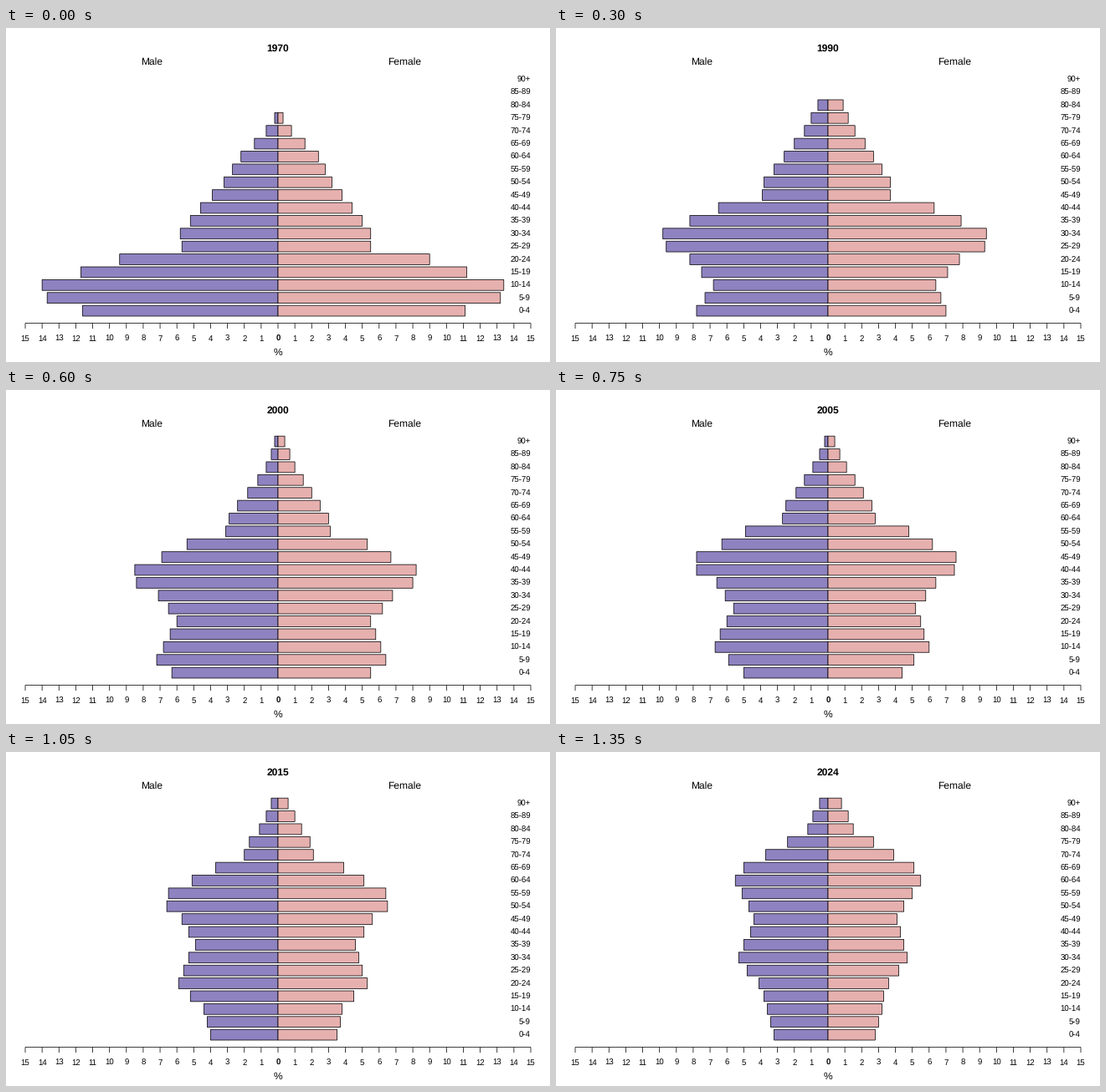
Recreate the animation shown at these times as a matplotlib script. Size 650 by 400 pixels, loop 1.5 s.

```python
import numpy as np
import matplotlib.pyplot as plt
from matplotlib.animation import FuncAnimation

plt.rcParams["font.family"] = "Liberation Sans"
plt.rcParams["text.hinting"] = "none"
plt.rcParams["path.snap"] = False

W, H, DPI = 650, 400, 100
PX = 72 / DPI              # one pixel in points
LW = 0.75 * PX
X0, UNIT = 325, 302 / 15   # zero line, pixels per percent
Y0, STEP = 338.6, 277 / 18
MALE, FEMALE = "#8e82c0", "#e6b0af"

GROUPS = 19
AGES = np.arange(GROUPS)
YEARS = [1970, 1980, 1990, 1995, 2000, 2005, 2010, 2015, 2020, 2024]

# Size of each five-year birth cohort, numbered by its age group in 1970.
COHORTS = [(-11, 7), (-7, 8.7), (-5, 11.7), (-2, 9.7), (0, 11.6), (1, 13.7),
           (2, 14), (4, 9.4), (5, 5.7), (6, 5.8), (10, 3.6), (12, 3.1), (16, 0)]


def shares(year, female):
    """Percent in each age group: cohorts age, thin out and lose weight."""
    t = year - 1970
    cohort = AGES - t / 5
    size = np.interp(cohort, *zip(*COHORTS))
    lifespan = 14.4 + 0.045 * t
    if female:
        size = size * np.interp(cohort, [-6, 0], [0.87, 0.96])
        lifespan += 1
    survival = np.exp(-(AGES / lifespan) ** 6)
    dilution = np.exp(-0.2 * (t / 10) ** 0.81)
    result = np.round(size * survival * dilution, 1)
    if year < 1995:        # early surveys stop at 80-84
        result[17:] = 0
    return result


fig = plt.figure(figsize=(W / DPI, H / DPI), dpi=DPI, facecolor="white")
ax = fig.add_axes([0, 0, 1, 1])
ax.axis("off")


def label(x, y, text, size=12, ha="center", **kw):
    return ax.text(x, y, text, fontsize=size * PX, ha=ha, va="baseline", **kw)


def line(xs, ys):
    ax.plot(xs, ys, color="black", lw=LW, solid_capstyle="butt")


title = label(X0, 28, "", weight="bold")
label(X0 - 7.5 * UNIT, 44, "Male")
label(X0 + 7.5 * UNIT, 44, "Female")
label(X0, 392, "%")

line([X0 - 15 * UNIT, X0 + 15 * UNIT], [353.5, 353.5])
for k in range(-15, 16):
    x = X0 + k * UNIT
    line([x, x], [353.5, 360])
    label(x, 375, str(abs(k)), 9.6, weight="normal" if k else "bold")

rows = Y0 - STEP * AGES
for i, y in enumerate(rows):
    name = f"{5 * i}-{5 * i + 4}" if i < GROUPS - 1 else "90+"
    label(627, y + 3.4, name, 9.6, ha="right")


def side(color):
    return ax.barh(rows, np.zeros(GROUPS), height=STEP / 1.2, left=X0,
                   color=color, edgecolor="black", linewidth=LW)


male, female = side(MALE), side(FEMALE)
ax.set_xlim(0, W)
ax.set_ylim(H, 0)


def update(n):
    year = YEARS[n]
    title.set_text(str(year))
    for bars, sign in ((male, -1), (female, 1)):
        for bar, share in zip(bars, shares(year, sign > 0)):
            bar.set_width(sign * share * UNIT)
            bar.set_visible(share > 0)


anim = FuncAnimation(fig, update, frames=len(YEARS), interval=150,
                     init_func=lambda: update(0), repeat=True, repeat_delay=0)
plt.show()
```
